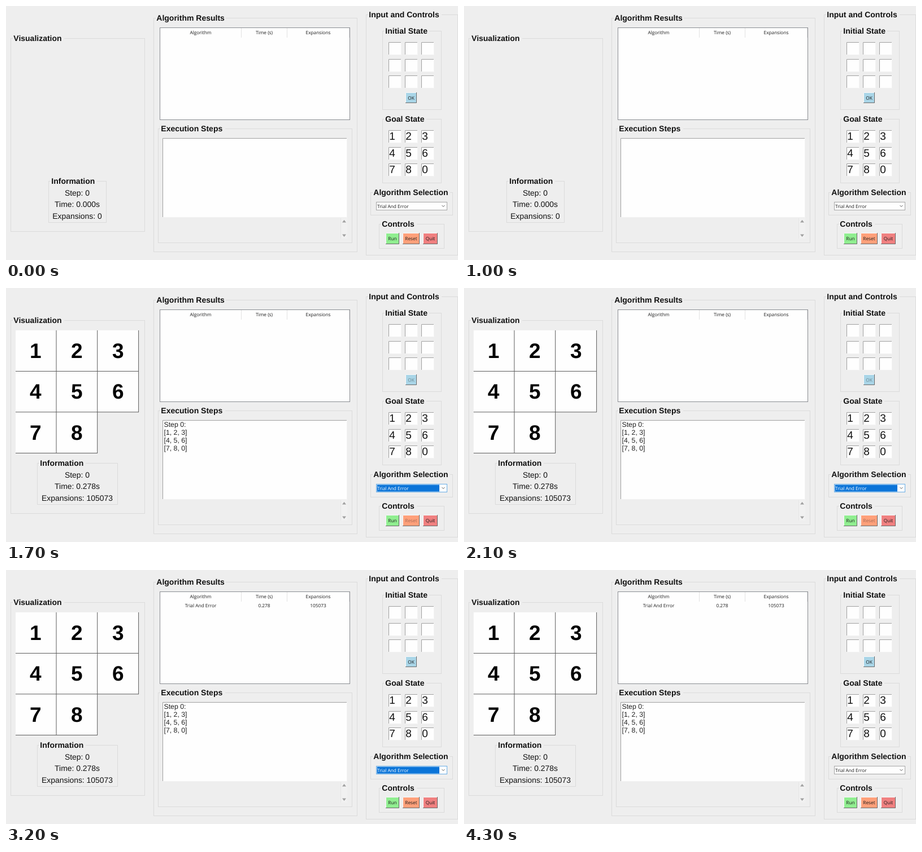
Write an HTML page that moves like this. It is 800 by 450 pixels and loops after 4400 ms.

```html
<!DOCTYPE html>
<html lang="en">
<head>
<meta charset="utf-8">
<title>Puzzle solver</title>
<style>
html, body { margin: 0; width: 100%; height: 100%; overflow: hidden; background: #eee; }
svg { display: block; width: 100%; height: 100%; }
text { font-family: "Liberation Sans", Arial, sans-serif; fill: #111; white-space: pre; text-rendering: geometricPrecision; }
.title { font-size: 14px; font-weight: bold; }
.info { font-size: 13.9px; text-anchor: middle; }
.ui { font-family: "Open Sans", "Noto Sans", sans-serif; font-size: 8.3px; fill: #1c1c1c; }
.mid { text-anchor: middle; }
.log { font-size: 12.3px; fill: #222; }
.digit { font-size: 19px; }
.tile { font-size: 37px; font-weight: bold; text-anchor: middle; fill: #000; }
.before, .press, .solved, .busy, .row, .picked { animation: 4.4s steps(1, end) infinite; }
.before { animation-name: before; }
.press { animation-name: press; }
.solved { animation-name: solved; }
.busy { animation-name: busy; }
.row { animation-name: row; }
.picked { animation-name: picked; }
/* switches at 1.4 s, 1.7 s, 2.4 s and 4.3 s */
@keyframes before { 0% { visibility: visible } 38.55%, 100% { visibility: hidden } }
@keyframes press { 0%, 38.55%, 100% { visibility: hidden } 31.75% { visibility: visible } }
@keyframes solved { 0% { visibility: hidden } 38.55%, 100% { visibility: visible } }
@keyframes busy { 0%, 54.45%, 100% { visibility: hidden } 38.55% { visibility: visible } }
@keyframes row { 0% { visibility: hidden } 54.45%, 100% { visibility: visible } }
@keyframes picked { 0%, 97.65%, 100% { visibility: hidden } 31.75% { visibility: visible } }
</style>
</head>
<body>
<svg id="stage" viewBox="0 0 800 450"></svg>
<script>
const BG = '#eee';
const rect = (x, y, w, h, fill, extra = '') =>
  `<rect x="${x}" y="${y}" width="${w}" height="${h}" fill="${fill}" ${extra}/>`;
const path = (d, stroke, fill = 'none', width = 1) =>
  `<path d="${d}" stroke="${stroke}" fill="${fill}" stroke-width="${width}"/>`;
const text = (x, y, s, cls, style = '') =>
  `<text x="${x}" y="${y}" class="${cls}" style="${style}">${s}</text>`;
const group = (cls, ...parts) => `<g class="${cls}">${parts.join('')}</g>`;
const outline = (x, y, w, h, fill, stroke) =>
  rect(x + .5, y + .5, w - 1, h - 1, fill, `stroke="${stroke}"`);

// Box with separately coloured top/left and bottom/right edges
const bevel = (x, y, w, h, fill, light, dark) =>
  rect(x, y, w, h, fill) +
  path(`M${x + .5} ${y + h}V${y + .5}H${x + w}`, light) +
  path(`M${x + w - .5} ${y}V${y + h - .5}H${x}`, dark);
const sunken = (x, y, w, h) => bevel(x, y, w, h, '#fefefe', '#a0a0a0', '#f2f2f2');

const frame = (x, y, right, bottom, title, titleWidth) =>
  outline(x, y, right - x + 1, bottom - y + 1, 'none', '#dbdbdb') +
  rect(x + 4, y - 2, titleWidth + 4, 5, BG) +
  text(x + 5.3, y + 4.9, title, 'title');

const button = (x, y, w, h, label, fill, ink = '#1c1c1c') =>
  bevel(x, y, w, h, fill, '#f8f8f8', '#6a6a6a') +
  text(x + w / 2, y + h / 2 + 3.2, label, 'ui mid', `fill:${ink}`);
const okButton = ink => button(707, 153, 20, 19, 'OK', '#a9d5e7', ink);
const resetButton = ink => button(702, 402, 30, 20, 'Reset', '#ffa07a', ink);

const entries = (top, values = []) => Array.from({ length: 9 }, (_, i) => {
  const x = 677 + 29 * (i % 3), y = top + Math.round(29.6 * Math.floor(i / 3));
  return sunken(x, y, 23, 23) + (values.length ? text(x + 1.3, y + 17.3, values[i], 'digit') : '');
}).join('');

const info = (x, right, titleWidth, time, count) =>
  frame(x, 310, right, 383, 'Information', titleWidth) +
  ['Step: 0', `Time: ${time}s`, `Expansions: ${count}`]
    .map((line, i) => text(126, 335.9 + 20.3 * i, line, 'info')).join('');

const tableRow = (y, cells) =>
  cells.map((cell, i) => text([344.5, 457, 552.5][i], y, cell, 'ui mid')).join('');

const board = () =>
  path('M17 75H235V220H162V293H17Z', 'none', '#fefefe') +
  path('M89 75V292.5M161.7 75V292.5M234.6 75V220M17 147.5H235M17 219.8H235M17 292.5H162', '#5c5c5c') +
  Array.from({ length: 8 }, (_, i) =>
    text(52.3 + 73 * (i % 3), 123.6 + 72.6 * Math.floor(i / 3), i + 1, 'tile')).join('');

const log = ['Step 0:', '[1, 2, 3]', '[4, 5, 6]', '[7, 8, 0]']
  .map((line, i) => text(279.5, 246.3 + 13.85 * i, line, 'log')).join('');

const cursor = path('M686.5 410.5V421.5L689 419.2L690.7 423L692.6 422.2L691 418.5H694.3Z', '#444', '#fff', .8);

const combo = (border, ink, selection = '') =>
  outline(655, 347, 126, 15, '#fefefe', border) +
  selection +
  text(657, 357.5, 'Trial And Error', 'ui', `fill:${ink}`) +
  path('M771.5 353L774 355.7L776.5 353', '#666');

document.getElementById('stage').innerHTML = [
  rect(0, 0, 800, 450, BG),
  frame(8, 57, 245, 399, 'Visualization', 87),
  frame(261, 21, 621, 435, 'Algorithm Results', 120),
  frame(269, 217, 612, 419, 'Execution Steps', 111),
  frame(637, 15, 799, 441, 'Input and Controls', 126),
  frame(666, 44, 770, 183, 'Initial State', 75),
  frame(666, 200, 770, 313, 'Goal State', 70),
  frame(645, 330, 790, 370, 'Algorithm Selection', 133),
  frame(660, 386, 775, 429, 'Controls', 59),

  outline(272, 38, 337, 164, '#fefefe', '#8a8d92'),
  path('M416.5 39V56M497.5 39V56M607.5 39V56', '#e2e2e2'),
  tableRow(50.3, ['Algorithm', 'Time (s)', 'Expansions']),
  group('row', tableRow(66.3, ['Trial And Error', '0.278', '105073'])),

  sunken(277, 234, 327, 141),
  rect(592, 376, 12, 36, '#f1f1f1'),
  path('M592.5 376V412', '#e6e6e6'),
  path('M595 383.5L598.5 379L602 383.5ZM595 404.5L598.5 409L602 404.5Z', 'none', '#a0a0a0'),

  entries(64),
  entries(220, [1, 2, 3, 4, 5, 6, 7, 8, 0]),
  okButton(),
  button(672, 402, 24, 20, 'Run', '#90ee90'),
  resetButton(),
  button(738, 402, 26, 20, 'Quit', '#f08080'),

  combo('#a6a6a6', '#1c1c1c'),
  group('picked', combo('#6aaee6', '#fff', rect(656.6, 348.6, 110.4, 12, '#0a74d8'))),

  group('before', info(75, 177, 78, '0.000', 0)),
  group('solved', board(), info(55, 197, 78, '0.278', 105073), log),
  group('busy', okButton('#6d8790'), resetButton('#a56c58')),
  group('press',
    bevel(672, 402, 24, 20, '#f0f0f0', '#777', '#fff'),
    text(685, 416.2, 'Run', 'ui mid'),
    cursor)
].join('');
</script>
</body>
</html>
```
